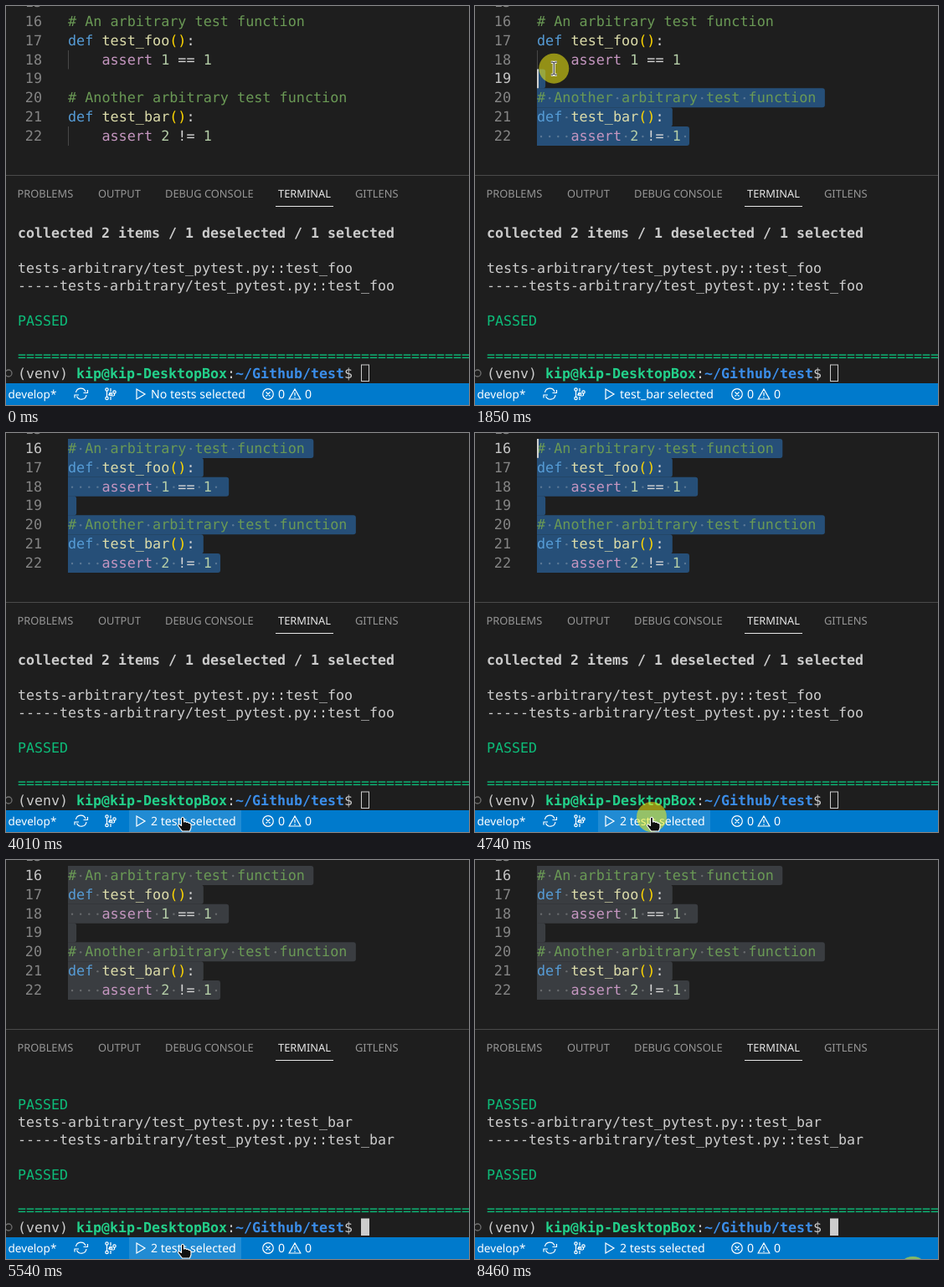
An HTML page that plays this animation: 553x477 px, repeating every 8.59 s.

```html
<!DOCTYPE html>
<html lang="en">
<head>
<meta charset="utf-8">
<title>Running selected tests</title>
<style>
  html, body { margin: 0; width: 100%; height: 100%; overflow: hidden; background: #1e1e1e; }
  svg { display: block; width: 553px; height: 477px; overflow: hidden; }
  text { white-space: pre; text-rendering: geometricPrecision; fill: #d4d4d4; }
  .code text { font: 16.8px "DejaVu Sans Mono", monospace; }
  .term text { font: 16.61px "DejaVu Sans Mono", monospace; fill: #ccc; }
  .tabs text { font: 12.85px "Noto Sans", sans-serif; fill: #969696; }
  .status text { font: 14.1px "Noto Sans", sans-serif; fill: #fff; }
  .tabs .on { fill: #e7e7e7; }
  .com { fill: #6a9955; } .key { fill: #569cd6; } .fn { fill: #dcdcaa; } .par { fill: #ffd700; }
  .ctl { fill: #c596c0; } .num { fill: #b5cea8; } .no { fill: #858585; } .no.now { fill: #c6c6c6; }
  .term .bold, .term .user, .term .path { font-weight: bold; }
  .pass { fill: #0dbc79; } .user { fill: #23d18b; } .path { fill: #3b8eea; }
  .dots { fill: #e3e4e2; fill-opacity: .28; }
  .icon { fill: none; stroke: #fff; stroke-width: 1.2; }
  .shape { fill: #111; stroke: #fff; stroke-width: 1.1; stroke-linejoin: round; }
</style>
</head>
<body>
<svg viewBox="0 0 553 477" xmlns="http://www.w3.org/2000/svg">
  <rect width="553" height="477" fill="#1e1e1e"/>
  <g class="code">
    <path d="M74.5 53V75.5M74.5 144V167" stroke="#484848"/>
    <g id="selection"></g>
    <g id="lines"></g>
    <rect id="caret" width="2" height="22.8" fill="#d0d0ce"/>
  </g>

  <rect y="202" width="553" height="275" fill="#1e1e1e"/>
  <rect y="202" width="553" height="1" fill="#4a4a4a"/>
  <g class="tabs">
    <text x="13.5" y="229">PROBLEMS</text>
    <text x="110" y="229">OUTPUT</text>
    <text x="190" y="229">DEBUG CONSOLE</text>
    <text x="325" y="229" class="on">TERMINAL</text>
    <text x="417" y="229">GITLENS</text>
    <rect x="322" y="239" width="69" height="1" fill="#e7e7e7"/>
  </g>
  <g class="term" id="terminal"></g>

  <g class="status">
    <rect y="451" width="553" height="26" fill="#007acc"/>
    <rect id="hover" x="147" y="451" width="134" height="26" fill="#fff" fill-opacity=".13"/>
    <text x="2.5" y="469" style="font-size:13.6px">develop*</text>
    <text x="173" y="469" id="picked"></text>
    <text x="325" y="469">0</text>
    <text x="357" y="469">0</text>
    <g class="icon">
      <path d="M83.5 462a6 6 0 0 1 11.5-1M96 465a6 6 0 0 1-11.500 1.500M92.500 462.500h5v-3.500M87 465h-5v3.500"/>
      <path d="M120.500 460v8M125 457v4M125 467v4M129.500 463v3M122 465q3 0 3-3M126 466h3"/>
      <circle cx="120.500" cy="458.500" r="1.700"/><circle cx="120.500" cy="469" r="1.700"/>
      <circle cx="125" cy="464" r="1.700"/><circle cx="129.500" cy="461.500" r="1.700"/>
      <path d="M156 458v12l10-6z"/>
      <circle cx="313" cy="464" r="6.300"/>
      <path d="M310.500 461.500l5 5M315.500 461.500l-5 5M345 458l6.800 12h-13.600zM345 462v4M345 467.300v1.400"/>
    </g>
  </g>

  <circle id="halo" r="18" fill="#f4ee12" fill-opacity=".55"/>
  <g id="pointer">
    <g id="beam" fill="none">
      <path d="M-3.500-7.500h2.500l1 1 1-1h2.500M-3.500 7.500h2.500l1-1 1 1h2.500M0-7V7" stroke="#fff" stroke-width="3"/>
      <path d="M-3.500-7.500h2.500l1 1 1-1h2.500M-3.500 7.500h2.500l1-1 1 1h2.500M0-7V7" stroke="#111"/>
    </g>
    <path id="arrow" class="shape" d="M0 0V14.500L3.500 11.500 6 17 8.500 16 6 10.500H10.500Z"/>
    <path id="hand" class="shape" d="M-1.500 1.500Q0-1 1.500 1.500V6Q3.500 4.500 4.500 6.500 6.500 5.500 7.500 7.500 10 7 10 9.500V13L8.500 17H-.5L-5.500 10.500Q-5.500 8-3.500 9L-1.500 10.500Z"/>
  </g>
</svg>
<script>
const LOOP = 8590, LEFT = 74, CHAR = 10.114, TOP = 7, ROW = 22.83;
const $ = id => document.getElementById(id);
const span = ([cls, text]) => `<tspan class="${cls}">${text}</tspan>`;
const textLine = (x, y, parts) => `<text xml:space="preserve" x="${x}" y="${y}">${parts.map(span).join('')}</text>`;

// Editor
const def = name => [['key', 'def '], ['fn', name], ['par', '()'], ['', ':']];
const check = (a, op) => [['ctl', '    assert '], ['num', a], ['', ` ${op} `], ['num', '1 ']];
const code = [
  [['com', '# An arbitrary test function']], def('test_foo'), check(1, '=='), [],
  [['com', '# Another arbitrary test function']], def('test_bar'), check(2, '!=')
];
const plain = code.map(parts => parts.map(p => p[1]).join(''));
const lastRow = code.length - 1;

$('lines').innerHTML = textLine(22.8, 24 - ROW, [['no', '15']]) + code.map((parts, i) =>
  textLine(22.8, 24 + i * ROW, [['no', 16 + i]]) + textLine(LEFT, 24 + i * ROW, parts)).join('');
const numbers = [...document.querySelectorAll('.no')].slice(1);

function caretAt([x, y]) {
  const row = Math.max(0, Math.floor((y + 3 - TOP) / ROW));
  if (row > lastRow) return { row: lastRow, col: plain[lastRow].length };
  const col = Math.round((x - LEFT) / CHAR);
  return { row, col: Math.max(0, Math.min(plain[row].length, col)) };
}

function selectionMarkup({ row, col }, color) {
  let bands = '', dots = '';
  for (let r = row; r <= lastRow; r++) {
    const from = r === row ? col : 0, y = TOP + r * ROW;
    const left = LEFT + from * CHAR;
    const right = LEFT + (plain[r].length + (r < lastRow)) * CHAR;
    if (right <= left) continue;
    bands += `<path fill="${color}" d="M${left} ${y}H${right - 3}q3 0 3 3v${ROW - 5.8}q0 3-3 3H${left}z"/>`;
    [...plain[r]].forEach((ch, c) => {
      if (ch === ' ' && c >= from)
        dots += `<circle cx="${LEFT + (c + .5) * CHAR}" cy="${y + 12}" r="1.2"/>`;
    });
  }
  return `${bands}<g class="dots">${dots}</g>`;
}

// Terminal
const prompt = [['', '(venv) '], ['user', 'kip@kip-DesktopBox'], ['', ':'], ['path', '~/Github/test'], ['', '$ ']];
const blank = [], passed = [['pass', 'PASSED']], rule = [['pass', '='.repeat(56)]];
const report = name => ['', '-----'].map(dash => [['', `${dash}tests-arbitrary/test_pytest.py::${name}`]])
  .concat([blank, passed]);
const output = [
  [['bold', 'collected 2 items / 1 deselected / 1 selected']], blank, ...report('test_foo'), blank, rule,
  [...prompt, ['', 'pytest --capture']],
  [['bold', 'collected 2 items']], blank, ...report('test_foo'), ...report('test_bar'), blank, rule, prompt
];
const firstPrompt = 8, finalPrompt = output.length - 1;
const scrolls = [[0, firstPrompt], [5080, 9], [5410, 11], [5480, 15], [5540, finalPrompt]];

function terminalMarkup(last, focused) {
  const top = last - 8, idle = last === firstPrompt || last === finalPrompt;
  const base = i => 276.5 + (i - top) * 21;
  let out = '';
  for (let i = top; i <= last; i++) {
    if (i === last && !idle) break;
    out += textLine(14, base(i), i === last ? prompt : output[i]);
    if (i === firstPrompt || i === finalPrompt)
      out += `<circle cx="3" cy="${base(i) - 5.5}" r="4" fill="none" stroke="#707070" stroke-width="1.3"/>`;
  }
  const x = idle ? 424 : 14, y = base(last) - 16;
  return out + (focused
    ? `<rect x="${x}" y="${y}" width="10" height="20.500" fill="#ccc"/>`
    : `<rect x="${x + .5}" y="${y + .5}" width="9" height="19.500" fill="none" stroke="#ccc"/>`);
}

// Pointer moves: start, end, number of steps, evenly timed points
const drag = [
  [1100, 1920, 12, [[196, 174], [180, 160], [145, 128], [100, 95], [91, 63]]],
  [1990, 2610, 10, [[88, 57], [70, 35], [58, 16], [57, 13]]]
];
const moves = [
  [0, 1, 2, [[530, 500], [530, 500]]],
  [70, 900, 13, [[518, 462], [470, 400], [380, 300], [270, 215], [210, 182], [196, 174]]],
  ...drag,
  [3030, 3810, 12, [[57, 13], [110, 60], [210, 190], [280, 340], [287, 435], [216, 461]]],
  [3940, 4010, 2, [[214, 460], [211, 459]]],
  [6800, 7650, 13, [[218, 461], [310, 463], [390, 463], [445, 462], [472, 461]]],
  [7720, 7860, 3, [[481, 463], [495, 469], [512, 480]]],
  [8460, 8461, 2, [[523, 492], [523, 492]]]
];
const latest = (list, t) => list.filter(item => item[0] <= t).pop();

function position(list, t) {
  const [start, end, count, points] = latest(list, t);
  const step = Math.min(count - 1, Math.floor((t - start) / (end - start) * (count - 1) + .001));
  const at = step / (count - 1) * (points.length - 1);
  const i = Math.min(points.length - 2, Math.floor(at));
  return [0, 1].map(k => points[i][k] + (points[i + 1][k] - points[i][k]) * (at - i));
}

const within = (t, a, b) => t >= a && t < b;
const show = (id, on) => { $(id).style.display = on ? '' : 'none'; };
const move = (id, x, y) => $(id).setAttribute('transform', `translate(${x} ${y})`);
const cache = {};
function fill(id, markup) {
  if (cache[id] !== markup) $(id).innerHTML = cache[id] = markup;
}

function render(t) {
  const [x, y] = position(moves, t);
  const clicked = t >= 1100;
  const caret = clicked ? caretAt(position(drag, t)) : { row: lastRow, col: plain[lastRow].length };

  fill('selection', clicked ? selectionMarkup(caret, t < 4810 ? '#264f78' : '#3a3d41') : '');
  numbers.forEach((n, i) => n.classList.toggle('now', clicked && i === caret.row));
  move('caret', LEFT + caret.col * CHAR, TOP + caret.row * ROW);
  show('caret', within(t, 1100, 2810) || within(t, 3340, 3810) || within(t, 4340, 4810));
  fill('picked', !clicked || caret.row > 5 ? 'No tests selected'
    : caret.row > 1 ? 'test_bar selected' : '2 tests selected');
  fill('terminal', terminalMarkup(latest(scrolls, t)[1], t >= 5010));

  const onBar = y > 451, hovering = onBar && x > 147 && x < 281;
  const onTabs = within(y, 203, 252);
  show('hover', hovering);
  show('hand', hovering);
  show('beam', !onBar && !onTabs);
  show('arrow', onTabs || onBar && !hovering);
  move('pointer', x, y);
  show('halo', within(t, 1100, 3030) || within(t, 4740, 5010) || t >= 8460);
  move('halo', x, y);
}

const began = performance.now();
function tick() {
  render((performance.now() - began) % LOOP);
  requestAnimationFrame(tick);
}
tick();
</script>
</body>
</html>
```
